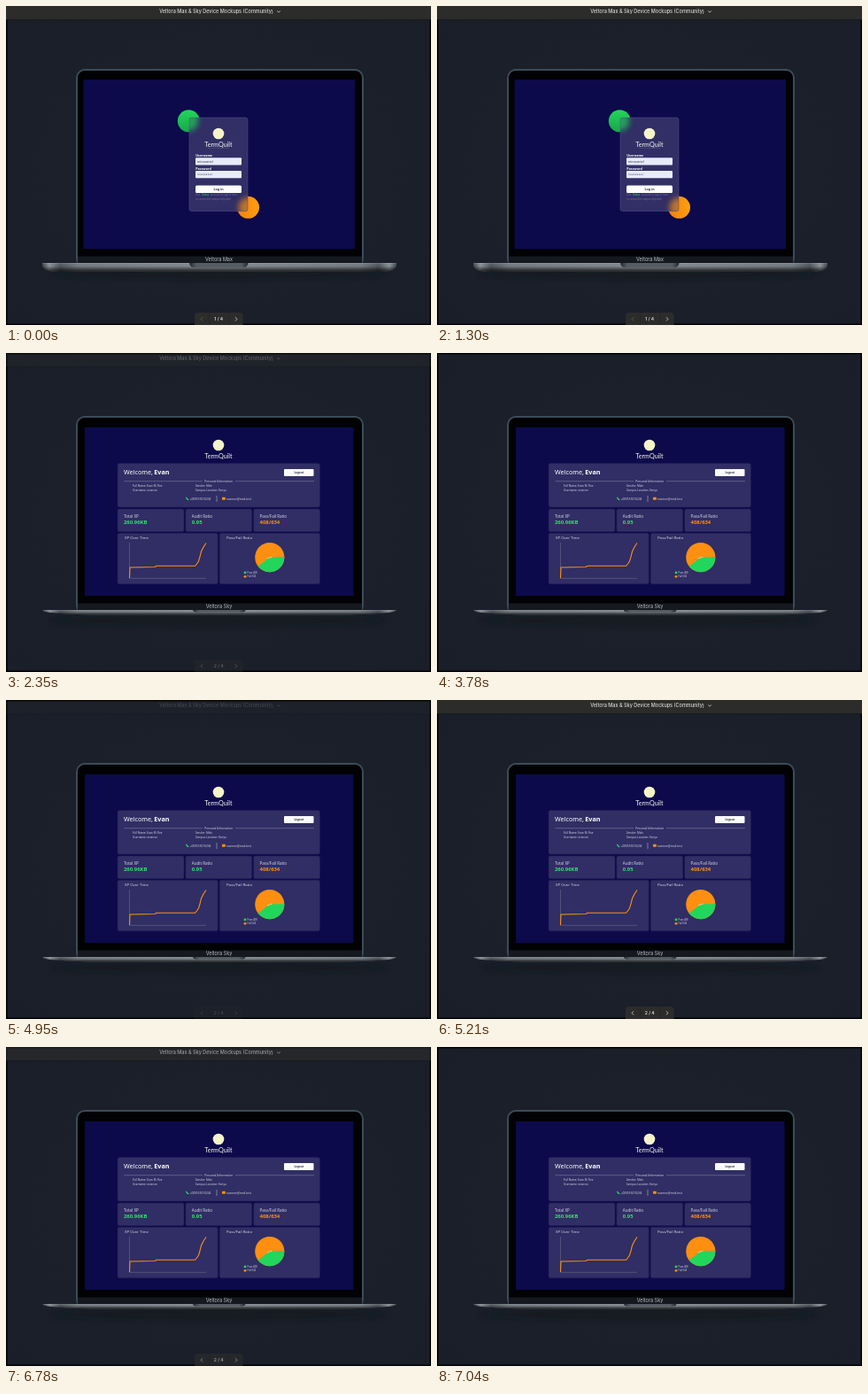
Write an HTML page that moves like this. It is 480 px wide and 360 px high and loops after 7.56 s.

```html
<!DOCTYPE html>
<html lang="en">
<head>
<meta charset="utf-8">
<title>Device mockups</title>
<style>
html, body { margin: 0; width: 100%; height: 100%; overflow: hidden; background: #000; }
svg { display: block; width: 100vw; height: 100vh; }
text { font-family: Inter, sans-serif; fill: #d8d8d8; }
.app text { font-family: "Noto Sans", "Open Sans", sans-serif; fill: #d3d2e4; }
.app .brand { font: 400 7.2px Lato, sans-serif; fill: #f6f6ea; }
.app .b { font-weight: 700; }
.app .white { fill: #fff; }
.app .green { fill: #2fe36d; }
.app .orange { fill: #ff9010; }
.app .dark { fill: #34344a; }
.app .dim { fill: #77749c; }
.mid { text-anchor: middle; }
.panel { fill: #302e64; stroke: #1d1b50; stroke-width: .5; }
.chev { fill: none; stroke: #d4d4d4; stroke-width: .8; }
</style>
</head>
<body>
<svg viewBox="0 0 480 360" preserveAspectRatio="none">
  <defs>
    <radialGradient id="bg" cx=".5" cy=".5" r=".75">
      <stop offset="0" stop-color="#1c212c"/><stop offset="1" stop-color="#191e28"/>
    </radialGradient>
    <linearGradient id="metal">
      <stop offset="0" stop-color="#3a4148"/><stop offset=".02" stop-color="#8c949a"/>
      <stop offset=".05" stop-color="#50575e"/><stop offset=".1" stop-color="#747c83"/>
      <stop offset=".5" stop-color="#858c92"/><stop offset=".9" stop-color="#747c83"/>
      <stop offset=".95" stop-color="#50575e"/><stop offset=".98" stop-color="#8c949a"/>
      <stop offset="1" stop-color="#3a4148"/>
    </linearGradient>
    <linearGradient id="shade" x2="0" y2="1">
      <stop offset="0" stop-color="#fff" stop-opacity=".22"/>
      <stop offset=".35" stop-color="#000" stop-opacity="0"/>
      <stop offset="1" stop-color="#000" stop-opacity=".8"/>
    </linearGradient>
    <linearGradient id="notch">
      <stop offset="0" stop-color="#23282e"/><stop offset=".12" stop-color="#555c63"/>
      <stop offset=".88" stop-color="#555c63"/><stop offset="1" stop-color="#23282e"/>
    </linearGradient>
    <linearGradient id="lime" x2="0" y2="1">
      <stop offset="0" stop-color="#22d75b"/><stop offset="1" stop-color="#18a54b"/>
    </linearGradient>
    <linearGradient id="amber">
      <stop offset="0" stop-color="#f07f12"/><stop offset="1" stop-color="#ffa00c"/>
    </linearGradient>
    <filter id="soft" x="-60%" y="-60%" width="220%" height="220%"><feGaussianBlur stdDeviation="3"/></filter>
    <filter id="edge"><feGaussianBlur stdDeviation=".6"/></filter>
    <clipPath id="card"><rect x="207" y="126" width="66" height="105.500" rx="2.500"/></clipPath>
  </defs>

  <rect width="480" height="360" fill="url(#bg)"/>
  <rect width="480" height="360" fill="none" stroke="#000" stroke-width="3" filter="url(#edge)"/>
  <ellipse cx="240" cy="302" rx="190" ry="5" fill="#0e1219" opacity=".5" filter="url(#soft)"/>

  <rect x="80" y="72" width="323" height="222" rx="9" fill="#020204" stroke="#3b4b59" stroke-width="2"/>
  <rect x="81" y="282.500" width="321" height="8" fill="#15191f"/>

  <g id="login" class="app">
    <rect x="87.500" y="83" width="306.500" height="191" fill="#0c0a4b"/>
    <circle cx="206.300" cy="129.800" r="12.500" fill="url(#lime)"/>
    <circle cx="273.500" cy="227.300" r="12.500" fill="url(#amber)"/>
    <g clip-path="url(#card)">
      <rect x="207" y="126" width="66" height="106" fill="#312f66"/>
      <g filter="url(#soft)" opacity=".75">
        <circle cx="206.300" cy="129.800" r="11" fill="#22c455"/>
        <circle cx="273.500" cy="227.300" r="11" fill="#e98a1c"/>
      </g>
    </g>
    <rect x="207" y="126" width="66" height="105.500" rx="2.500" fill="none" stroke="#54528a" stroke-width=".5"/>
  </g>

  <g id="dash" class="app">
    <rect x="89" y="84" width="303.500" height="190" fill="#0c0a4b"/>
  </g>

  <g id="proBase">
    <path id="proBody" d="M41 290H441V293.500Q439 299.500 425 299.800H57Q43 299.500 41 293.500Z" fill="url(#metal)"/>
    <path d="M41 290H441V293.500Q439 299.500 425 299.800H57Q43 299.500 41 293.500Z" fill="url(#shade)"/>
    <path d="M207 290H273.500Q273 295 268 295H212.500Q207.500 295 207 290Z" fill="url(#notch)"/>
  </g>
  <g id="liteBase">
    <path d="M41 290H441Q440 292.500 425 293.500Q400 295.500 370 295.500H112Q80 295.500 57 293.500Q42 292.500 41 290Z" fill="url(#metal)"/>
    <path d="M41 290H441Q440 292.500 425 293.500Q400 295.500 370 295.500H112Q80 295.500 57 293.500Q42 292.500 41 290Z" fill="url(#shade)"/>
    <path d="M211 290H270.500Q270 292.800 266 292.800H215.500Q211.500 292.800 211 290Z" fill="url(#notch)"/>
  </g>
  <text id="model" class="mid" x="240.500" y="288.100" font-size="5.500" style="fill:#b9bdc3"></text>

  <g id="bars">
    <rect width="480" height="15.500" fill="#2c2c2b"/>
    <path d="M0 15.500H480" stroke="#11141a" stroke-width=".7"/>
    <g id="title">
      <text class="mid" x="237.500" y="8.100" font-size="5.500" font-weight="500">Veltora Max &amp; Sky Device Mockups (Community)</text>
      <path class="chev" d="M306.200 5.500l1.800 1.700 1.800-1.700"/>
    </g>
    <path d="M213 360V350Q213 346 217 346H263.500Q267.500 346 267.500 350V360Z" fill="#2c2c2b"/>
    <path d="M229.500 346V360M251.500 346V360" stroke="#242423" stroke-width=".6"/>
    <path id="prev" class="chev" d="M222 351.200l-1.900 2.100 1.900 2.100"/>
    <path id="next" class="chev" d="M259 351.200l1.900 2.100-1.900 2.100"/>
    <text id="page" class="mid" x="240.200" y="355.200" font-size="5" font-weight="600"></text>
  </g>
</svg>
<script>
const LOOP = 7560, STEPS = 58;
const $ = id => document.getElementById(id);
const login = $('login'), dash = $('dash');

function add(parent, tag, attrs, text) {
  const el = document.createElementNS('http://www.w3.org/2000/svg', tag);
  for (const k in attrs) el.setAttribute(k, attrs[k]);
  if (text) el.textContent = text;
  parent.appendChild(el);
  return el;
}
const label = (g, x, y, size, text, cls = '') => add(g, 'text', { x, y, 'font-size': size, class: cls }, text);
const box = (g, x, y, width, height, rx, fill) => add(g, 'rect', { x, y, width, height, rx, fill });
const dot = (g, cx, cy, r, fill) => add(g, 'circle', { cx, cy, r, fill });
const line = (g, d, stroke, width) => add(g, 'path', { d, stroke, 'stroke-width': width, fill: 'none' });
const panel = (x, y, width, height) => add(dash, 'rect', { x, y, width, height, rx: 2, class: 'panel' });

function brand(g, y) {
  dot(g, 240, y, 6.3, '#f4f3c9');
  label(g, 240, y + 14.6, 7.2, 'TermQuilt', 'brand mid');
}

function buildLogin() {
  brand(login, 144);
  label(login, 240, 161.3, 1.8, 'Track your learning progress', 'dim mid');
  label(login, 214.3, 170, 3.7, 'Username', 'white b');
  box(login, 214, 171.3, 52, 8.2, 1, '#e7ebfa');
  label(login, 216, 176.6, 3.5, 'mirovantel', 'dark');
  label(login, 214.3, 184.8, 3.7, 'Password', 'white b');
  box(login, 214, 186, 52, 8.3, 1, '#e7ebfa');
  for (let i = 0; i < 9; i++) dot(login, 217 + i * 1.9, 190, .6, '#34344a');
  box(login, 214, 202.6, 52, 8.4, 1.5, '#fdfdfd');
  label(login, 240, 208.3, 3.7, 'Log in', 'dark b mid');
  label(login, 214.3, 214.3, 2.8, 'Use', 'dim');
  label(login, 221, 214.3, 2.8, 'Status', 'green');
  label(login, 231, 214.3, 2.8, 'account to sign in here', 'dim');
  label(login, 214.3, 219.4, 2.6, 'or contact the campus help desk', 'dim');
}

function buildDash() {
  brand(dash, 104);
  panel(126, 124.5, 228.5, 49.5);
  label(dash, 133, 137.3, 7.2, 'Welcome,', 'white');
  label(dash, 167.3, 137.3, 7.2, 'Evan', 'white b');
  box(dash, 314, 131, 33.5, 8, 1, '#fafafa');
  label(dash, 330.7, 136.2, 3, 'Logout', 'dark b mid');
  line(dash, 'M133.500 144.700H222M259 144.700H348', '#807ea5', .6);
  label(dash, 240.3, 145.9, 3.2, 'Personal Information', 'mid');
  label(dash, 143, 150.9, 3.05, 'Full Name: Evan M. Roe');
  label(dash, 143, 155.7, 3.05, 'Username: evanroe');
  label(dash, 213.7, 150.9, 3.05, 'Gender: Male');
  label(dash, 213.7, 155.7, 3.05, 'Campus Location: Kenya');
  line(dash, 'M203.600 162.800Q203.800 165.300 206.300 165.600', '#2fe36d', 1.1);
  label(dash, 207.7, 165.5, 3.2, '+000555010234');
  line(dash, 'M238 161V168', '#b5b3cc', .6);
  box(dash, 244, 162.8, 3.8, 2.9, .4, '#ff9010');
  label(dash, 249, 165.5, 3.2, 'evanroe@mail.test');

  [['Total XP', '260.96KB', 'green'], ['Audit Ratio', '0.95', 'green'], ['Pass/Fail Ratio', '408/634', 'orange']]
    .forEach(([name, value, tone], i) => {
      const x = 126 + i * 76.8;
      panel(x, 176, 75, 25.7);
      label(dash, x + 7, 186.3, 4.5, name);
      label(dash, x + 7, 193.4, 5.9, value, tone + ' b');
    });

  panel(126, 203.3, 113.3, 57.5);
  label(dash, 134, 209.6, 4.3, 'XP Over Time');
  line(dash, 'M139.500 214V254.300H226', '#77758f', .5);
  line(dash, 'M139.500 254L140 242 168 241.500 170 240.300H213.500L215.500 238 217.500 235 219 230 220.500 224 223 219 226 214.500',
    '#ff9010', 1.1);

  panel(241.2, 203.3, 113.3, 57.5);
  label(dash, 249, 209.6, 4.3, 'Pass/Fail Ratio');
  dot(dash, 297.8, 230.6, 16.6, '#ff8f10');
  add(dash, 'path', { d: 'M297.800 230.600L314.400 230A16.600 16.600 0 0 1 284.600 240.700Z', fill: '#22d65b' });
  line(dash, 'M294.800 231.800L300.500 230.200', '#f2e6b8', .7);
  dot(dash, 270, 247.9, 1.4, '#22d65b');
  dot(dash, 270, 252.3, 1.4, '#ff8f10');
  label(dash, 272.5, 248.9, 2.7, 'Pass 408');
  label(dash, 272.5, 253.3, 2.7, 'Fail 634');
}

// Visibility of the viewer controls at a given step.
function barAlpha(k) {
  if (k < 15) return 1;
  if (k < 20) return (20 - k) / 6;
  if (k < 35) return 0;
  if (k < 40) return ((k - 34) / 6) ** 4;
  if (k < 52) return 1;
  return Math.max(0, (54 - k) / 3);
}

const show = (id, on) => $(id).setAttribute('display', on ? 'inline' : 'none');

function draw(t) {
  const k = Math.floor((t + 6) / (LOOP / STEPS)) % STEPS;
  const second = k >= 13;
  show('login', !second);
  show('proBase', !second);
  show('dash', second);
  show('liteBase', second);
  show('title', k !== 13);
  $('model').textContent = second ? 'Veltora Sky' : 'Veltora Max';
  $('page').textContent = second ? '2 / 4' : '1 / 4';
  $('prev').setAttribute('opacity', second ? (k === 13 ? .75 : 1) : .3);
  $('next').setAttribute('opacity', k === 13 ? .75 : 1);
  $('bars').setAttribute('opacity', barAlpha(k));
}

buildLogin();
buildDash();
const start = performance.now();
function tick() {
  draw((performance.now() - start) % LOOP);
  requestAnimationFrame(tick);
}
tick();
</script>
</body>
</html>
```
